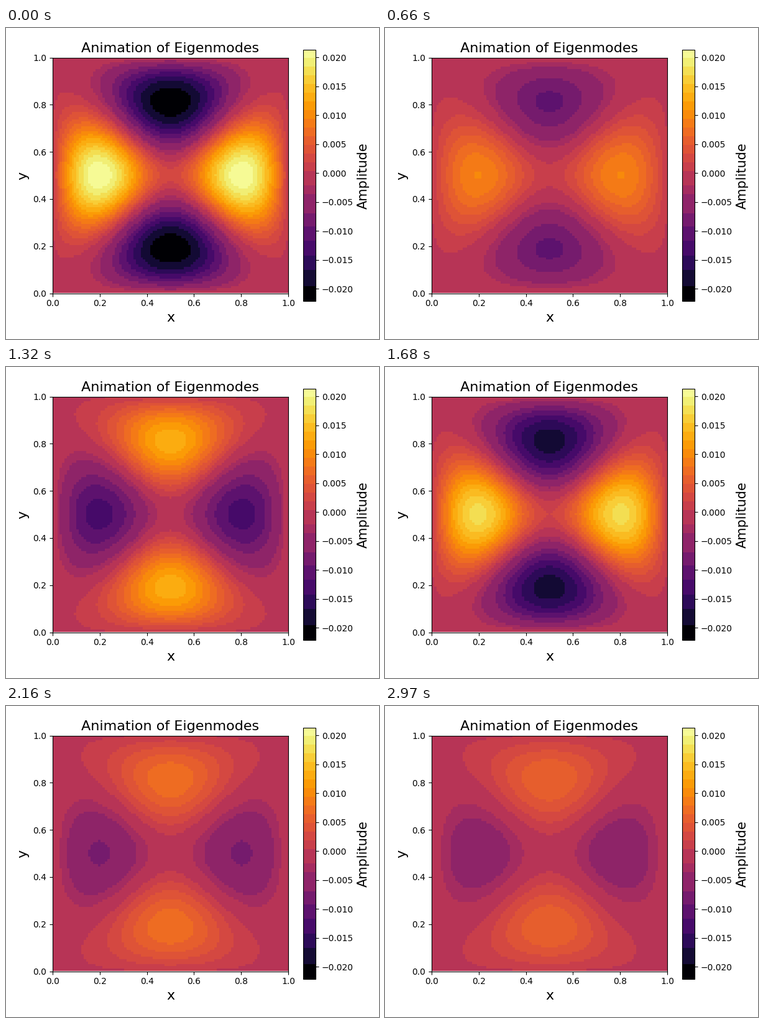
Animation, 600 px wide and 500 px high, one loop 3 s. Source, as a matplotlib script:

```python
import numpy as np
import matplotlib.pyplot as plt
from matplotlib.animation import FuncAnimation
from matplotlib.colors import ListedColormap

W, H, DPI = 600, 500, 100
FRAMES, INTERVAL = 100, 30
CELLS = 99      # interior grid points per side
OMEGA = 0.2351  # phase advance per frame
MIX = np.pi / 4 + 0.08


def eigenmode():
    """Normalised mix of the degenerate (3,1) and (1,3) membrane modes."""
    s = np.pi * np.arange(1, CELLS + 1) / (CELLS + 1)
    one, three = np.sin(s), np.sin(3 * s)
    norm = 2 / (CELLS + 1)
    return norm * (np.cos(MIX) * np.outer(one, three)
                   - np.sin(MIX) * np.outer(three, one))


def banded_cmap(lo, hi, size=434):
    """Inferno reduced to flat bands, wider on the dark side."""
    inner = np.concatenate([
        [-0.0195, -0.0167, -0.0142, -0.0117, -0.0092, -0.0069, -0.0036, -0.0021],
        0.0004 + 0.0015 * np.arange(14)])
    edges = np.concatenate([[lo], inner, [hi]])
    mids = (edges[:-1] + edges[1:]) / 2
    level = (mids - lo) / (hi - lo)
    level[0] = 0.005
    values = lo + (np.arange(size) + 0.5) / size * (hi - lo)
    return ListedColormap(plt.get_cmap("inferno")(level[np.digitize(values, inner)]))


def add_axes(fig, left, top, width, height):
    return fig.add_axes([left / W, 1 - (top + height) / H, width / W, height / H])


mode = eigenmode()
lo, hi = mode.min(), mode.max()

plt.rcParams["font.family"] = "DejaVu Sans"
fig = plt.figure(figsize=(W / DPI, H / DPI), dpi=DPI)
ax = add_axes(fig, 75, 47.5, 379, 379)
cax = add_axes(fig, 477.8, 35.2, 20.2, 404)

image = ax.imshow(mode, cmap=banded_cmap(lo, hi), vmin=lo, vmax=hi,
                  extent=(0, 1, 0, 1), origin="lower",
                  interpolation="nearest", aspect="auto")
ax.set_title("Animation of Eigenmodes", fontsize=16)
ax.set_xlabel("x", fontsize=16)
ax.set_ylabel("y", fontsize=16)

bar = fig.colorbar(image, cax=cax)
bar.set_label("Amplitude", fontsize=15)


def update(frame):
    image.set_data(mode * np.cos(OMEGA * frame))
    return [image]


anim = FuncAnimation(fig, update, frames=FRAMES, interval=INTERVAL,
                     repeat=True, repeat_delay=0)
plt.show()
```
